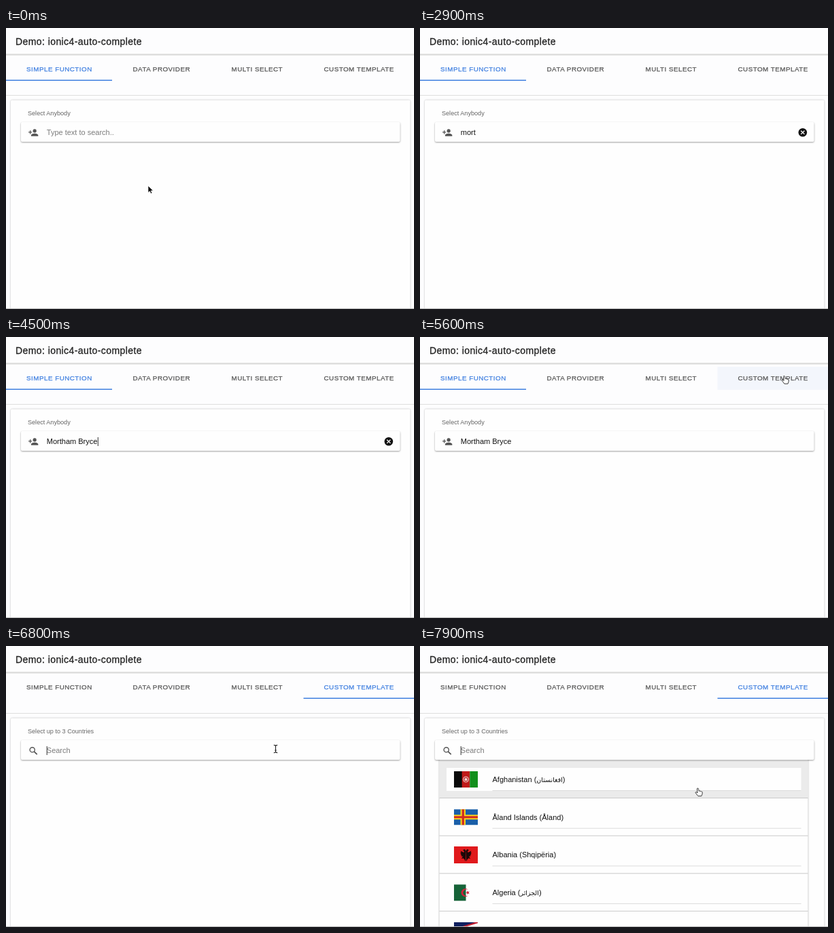
These frames come from a looping animation (600x415 px, 8 s). An HTML page:

```html
<!DOCTYPE html>
<html lang="en">
<head>
<meta charset="utf-8">
<title>Auto-complete demo</title>
<style>
  html, body { margin: 0; width: 100%; height: 100%; overflow: hidden; background: #fdfdfe; }
  svg { display: block; width: 600px; height: 415px; }
  text { font: 11px "Liberation Sans", "DejaVu Sans", Arial, sans-serif; fill: #111; }
  .title { font-size: 14px; letter-spacing: .42px; fill: #222; stroke: #222; stroke-width: .3px; }
  .tab { font-size: 9.8px; letter-spacing: .5px; fill: #555; stroke: #555; stroke-width: .25px; }
  .tab.on { fill: #3f7fe0; stroke: #3f7fe0; }
  .label { font-size: 9.1px; fill: #666; }
  .name { font-size: 9.8px; fill: #666; }
  .name tspan { font-weight: bold; fill: #555; }
  .arabic { font-size: 9.5px; }
  .raised { filter: drop-shadow(0 1px 1px rgba(0, 0, 0, .38)); }
  .card { filter: drop-shadow(0 0 1px rgba(0, 0, 0, .28)); }
  .rule { fill: #c9c9c9; }
  .hint { fill: #7c7c7c; }
</style>
</head>
<body>
<svg viewBox="0 0 600 415">
  <rect width="600" height="415" fill="#fdfdfe"/>

  <rect y="38.5" width="600" height="1" fill="#c2c2c2"/>
  <rect y="39.5" width="600" height="1" fill="#dcdcdc"/>
  <text class="title" x="14" y="25">Demo: ionic4-auto-complete</text>

  <rect id="hover" x="437.5" y="44" width="162.5" height="34" fill="#f3f6fc"/>
  <text class="tab" id="tabA" x="30" y="64.2">SIMPLE FUNCTION</text>
  <text class="tab" x="186.5" y="64.2">DATA PROVIDER</text>
  <text class="tab" x="331.5" y="64.2">MULTI SELECT</text>
  <text class="tab" id="tabB" x="467.5" y="64.2">CUSTOM TEMPLATE</text>
  <rect id="bar" y="76.5" height="1.5" fill="#3f7fe0"/>
  <rect y="99" width="600" height="1" fill="#dedede"/>

  <rect class="card" x="7" y="106.5" width="587.5" height="320" rx="2" fill="#fefefe"/>
  <text class="label" id="label" x="32" y="129"></text>

  <g id="people">
    <rect class="raised" x="28.5" y="165" width="542" height="76.5" fill="#fefefe"/>
    <rect id="pick" x="28.5" width="542" height="36.5" fill="#ebebeb"/>
    <rect class="rule" x="28.5" y="205" width="542" height="1"/>
    <text class="name" x="39" y="191"><tspan>Mort</tspan> Selby</text>
    <text class="name" x="39" y="227.5"><tspan>Mort</tspan>ham Bryce</text>
  </g>

  <g id="countries">
    <rect class="raised" x="28.5" y="165" width="542" height="260" fill="#fefefe"/>
    <rect id="lit" x="28.5" y="169" width="542" height="55.5" fill="#ebebeb"/>
    <rect x="39" y="180" width="521.5" height="34" fill="#fefefe"/>
    <g id="rows"></g>
    <g id="flags">
      <g transform="translate(50 185)">
        <path d="M0 0h12v24H0z" fill="#0a0a0a"/>
        <path d="M11.7 0h11.7v24H11.7z" fill="#c01a1a"/>
        <path d="M23.3 0H35v24H23.3z" fill="#12901c"/>
        <circle cx="17.5" cy="12" r="4" fill="none" stroke="#f3dcdc" stroke-width="1"/>
        <path d="M15.5 14v-3l2-1.6 2 1.6v3z" fill="#f0cfcf"/>
      </g>
      <g transform="translate(50 241.3)">
        <path d="M0 0h35v23H0z" fill="#1a5fa8"/>
        <path d="M9.5 0h7.5v23H9.5zM0 8h35v7H0z" fill="#f8d21c"/>
        <path d="M11.7 0h3.2v23h-3.2zM0 10h35v3H0z" fill="#d22a22"/>
      </g>
      <g transform="translate(50 296)">
        <path d="M0 0h35v25H0z" fill="#e0191c"/>
        <path id="wing" d="M17.5 6.5 15.5 4 13 5.5l2 1.5-.5 2L9.5 6.5 10.5 9 9 9.5l1.6 1.7-1 1 1.7 1-.8 1.3 2.6.3-2.2 3.2 2.8-.5 1.8 1.8 1.5 3z" fill="#1c0808"/>
        <use href="#wing" transform="matrix(-1 0 0 1 35 0)"/>
      </g>
      <g transform="translate(50 352.3)">
        <path d="M0 0h35v24H0z" fill="#fefefe"/>
        <path d="M0 0h17.5v24H0z" fill="#166338"/>
        <path d="M21 8a6 6 0 1 0 0 8 4.8 4.8 0 1 1 0-8z" fill="#d0213a"/>
        <path d="m17 12 2.1-.8.1-2.2 1.4 1.7 2.1-.6-1.2 1.9 1.2 1.9-2.1-.6-1.4 1.7-.1-2.2z" fill="#d0213a"/>
      </g>
      <g transform="translate(50 408)">
        <path d="M0 0h35v20H0z" fill="#10205f"/>
        <path d="M35 0H31L0 10v2l35 8z" fill="#c41f30"/>
        <path d="M35 1.2 3 11l32 8z" fill="#fefefe"/>
      </g>
    </g>
  </g>

  <rect class="raised" x="22" y="139" width="557.5" height="29" rx="2" fill="#fefefe"/>
  <path id="person" transform="translate(32.4 146.7) scale(.65)" fill="#555"
    d="M15 12a4 4 0 1 0 0-8 4 4 0 0 0 0 8zM6 10V7H4v3H1v2h3v3h2v-3h3v-2zM15 14c-2.7 0-8 1.3-8 4v2h16v-2c0-2.7-5.3-4-8-4z"/>
  <g id="glass" fill="none" stroke="#555" stroke-width="1.4">
    <circle cx="38.7" cy="153.3" r="3.6"/>
    <path d="m41.3 155.9 4.4 4.3" stroke-width="1.8"/>
  </g>
  <text id="field" x="59.8" y="158.3"></text>
  <rect id="caret" y="148" width="1" height="13" fill="#333"/>
  <g id="clear">
    <circle cx="562.8" cy="154.3" r="6.3" fill="#111"/>
    <path d="m560.2 151.7 5.2 5.2m0-5.2-5.2 5.2" stroke="#fff" stroke-width="1.3"/>
  </g>

  <rect y="414" width="600" height="1" fill="#b8b8b8"/>

  <g id="pointer">
    <path id="arrow" d="M0 0V10.2L2.4 8 4 11.6 5.8 10.8 4.2 7.3H7.4Z" fill="#000" stroke="#fff" stroke-width=".7"/>
    <path id="beam" d="M-2.7-5.6Q0-5.6 0-4Q0-5.6 2.7-5.6M0-4.5V4.5M-2.7 5.6Q0 5.6 0 4Q0 5.6 2.7 5.6M-1.3 2H1.3" fill="none" stroke="#222" stroke-width="1.1"/>
    <path id="hand" d="M-1 1Q-.8-.4 .3 0Q1 .4 1.2 1.6L1.7 4.2Q3 3.6 3.6 4.6Q5 4.2 5.4 5.2Q6.8 5 6.8 6.4L6.4 9.2 5.4 11.6H.4L-1.8 8.8-3.4 6.6Q-3.4 5.4-2 5.8L-.4 7Z" fill="#fff" stroke="#222" stroke-width=".9" stroke-linejoin="round"/>
  </g>
</svg>
<script>
const LOOP = 8000, STEP = 100, SWITCH = 5800, OPEN = 6900;
const $ = id => document.getElementById(id);
const show = (id, on) => { $(id).style.display = on ? "" : "none"; };
const within = (t, spans) => spans.some(([a, b]) => t >= a && t < b);

// Time, x, y of the pointer's hot spot
const path = [
  [0, 209, 233], [400, 179, 164], [700, 179, 164], [1100, 166, 153],
  [4700, 166, 153], [5600, 535.5, 57.5], [5900, 535.5, 57.5],
  [6500, 396.5, 152], [7000, 396.5, 152], [7900, 408.5, 210]
];
const typed = [[1800, "m"], [1900, "mo"], [2100, "mor"], [2300, "mort"], [4500, "Mortham Bryce"], [SWITCH, ""]];
const blinks = [[1700, 2800], [3300, 3800], [4300, 5000], [5500, 5600], [6600, 7100], [7600, LOOP]];

const names = [
  "Afghanistan (<tspan class='arabic'>افغانستان</tspan>)",
  "Åland Islands (Åland)",
  "Albania (Shqipëria)",
  "Algeria (<tspan class='arabic'>الجزائر</tspan>)",
  "American Samoa"
];
$("rows").innerHTML = names.map((name, i) => {
  const y = i * 55.7;
  return `<text x="106.5" y="${201 + y}">${name}</text>
    <rect x="106.5" y="${213 + y}" width="454" height="1" fill="#dcdcdc"/>
    <rect class="rule" x="28.5" y="${224 + y}" width="542" height="1"/>`;
}).join("");

function pointerAt(t) {
  const i = path.findIndex(p => p[0] > t);
  if (i < 0) return path[path.length - 1].slice(1);
  const [t0, x0, y0] = path[i - 1], [t1, x1, y1] = path[i];
  const u = (t - t0) / (t1 - t0), e = u * u * (3 - 2 * u);
  return [x0 + (x1 - x0) * e, y0 + (y1 - y0) * e];
}

function drawPointer(t) {
  const [x, y] = pointerAt(t);
  const overTab = y > 44 && y < 78, overList = t >= OPEN && y > 170;
  const kind = overTab || overList ? "hand" : y > 140 && y < 163 ? "beam" : "arrow";
  for (const k of ["arrow", "beam", "hand"]) show(k, k === kind);
  show("pointer", t < 1800 || t >= 4800);
  $("pointer").setAttribute("transform", `translate(${x} ${y})`);
  show("hover", t >= 4800 && overTab && x > 437);
  show("lit", overList);
}

function drawField(t, second) {
  const value = typed.reduce((v, [at, s]) => t >= at ? s : v, "");
  const field = $("field");
  field.textContent = value || (second ? "Search" : "Type text to search..");
  field.setAttribute("class", value ? "" : "hint");
  $("caret").setAttribute("x", value ? 60.2 + field.getComputedTextLength() : 59.7);
  show("caret", within(t, blinks));
  show("clear", t >= 1800 && t < 5600);
}

function draw(t) {
  const second = t >= SWITCH;
  $("tabA").classList.toggle("on", !second);
  $("tabB").classList.toggle("on", second);
  $("bar").setAttribute("x", second ? 437.5 : 0);
  $("bar").setAttribute("width", second ? 162.5 : 156);
  $("label").textContent = second ? "Select up to 3 Countries" : "Select Anybody";
  show("person", !second);
  show("glass", second);
  show("people", t >= 3100 && t < 4500);
  show("pick", t >= 3600);
  $("pick").setAttribute("y", t < 4000 ? 169 : 205);
  show("countries", t >= OPEN);
  show("flags", t >= OPEN + STEP);
  drawField(t, second);
  drawPointer(t);
}

let start;
function tick(now) {
  start ??= now;
  draw(Math.floor((now - start) % LOOP / STEP) * STEP);
  requestAnimationFrame(tick);
}
draw(0);
requestAnimationFrame(tick);
</script>
</body>
</html>
```
